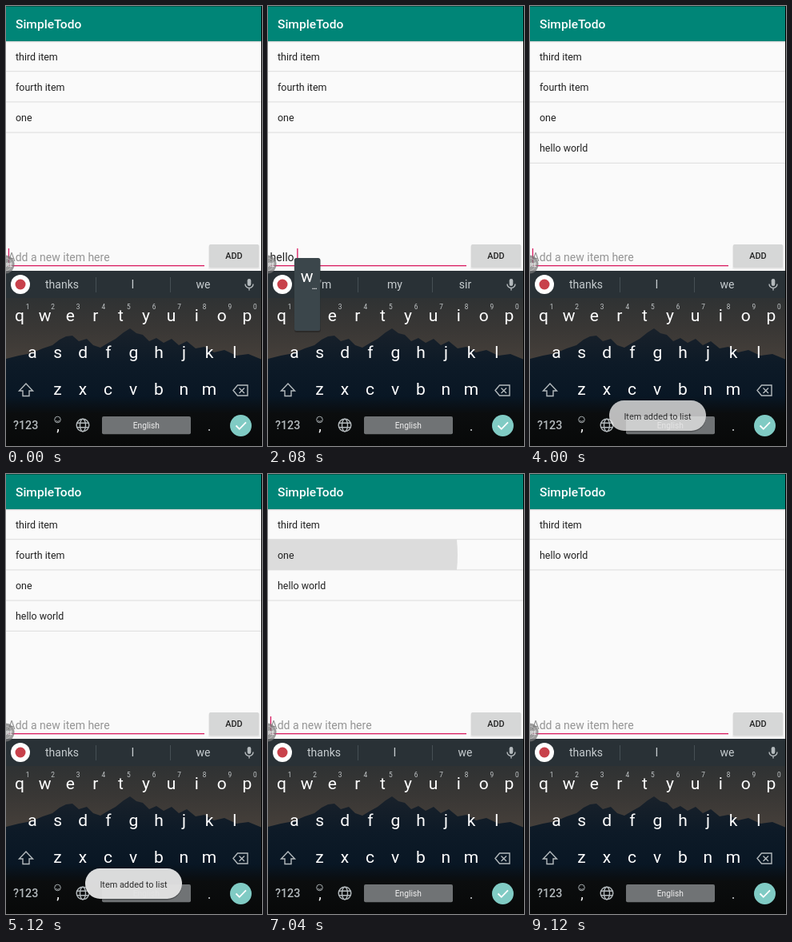
Recreate the animation shown at these times as an HTML page. Size 320 by 550 pixels, loop 9600 ms.

```html
<!DOCTYPE html>
<html lang="en">
<head>
<meta charset="utf-8">
<title>Todo list</title>
<style>
html, body { margin: 0; width: 100%; height: 100%; overflow: hidden; background: #fafafa; }
svg { display: block; width: 320px; height: 550px; font-family: Roboto, "Noto Sans", sans-serif; }
text { white-space: pre; }
.line { fill: none; stroke: #b4babd; stroke-width: 1.4; }
.thin { stroke-width: .9; }
#composing { text-decoration: underline; text-decoration-thickness: 1px; }
</style>
</head>
<body>
<svg id="stage" viewBox="0 0 320 550">
  <defs>
    <linearGradient id="shade" x2="0" y2="1">
      <stop stop-color="#000" stop-opacity=".18"/><stop offset="1" stop-color="#000" stop-opacity="0"/>
    </linearGradient>
    <linearGradient id="sky" gradientUnits="userSpaceOnUse" x1="0" x2="0" y1="365" y2="440">
      <stop stop-color="#2f3233"/><stop offset=".5" stop-color="#393735"/><stop offset="1" stop-color="#453f3a"/>
    </linearGradient>
    <linearGradient id="rock" gradientUnits="userSpaceOnUse" x1="0" x2="0" y1="400" y2="505">
      <stop stop-color="#1a222b"/><stop offset=".45" stop-color="#0d1a27"/><stop offset="1" stop-color="#071523"/>
    </linearGradient>
    <linearGradient id="ground" x2="0" y2="1">
      <stop stop-color="#0b0d0e" stop-opacity="0"/><stop offset=".35" stop-color="#0b0d0e"/><stop offset="1" stop-color="#080909"/>
    </linearGradient>
    <clipPath id="rowClip"><rect y="82" width="319" height="38"/></clipPath>
  </defs>

  <rect width="320" height="550" fill="#fafafa"/>
  <g clip-path="url(#rowClip)">
    <rect id="hot" y="82" width="319" height="38" fill="#e2e2e2"/>
    <circle id="ripple" cx="60" cy="101" r="177" fill="#dcdcdc"/>
  </g>
  <g id="list"></g>
  <rect width="320" height="44" fill="#008577"/>
  <rect width="320" height="1" fill="#00574b"/>
  <rect y="44" width="320" height="2" fill="url(#shade)"/>

  <text id="input" x="2.6" y="318.6" font-size="14"><tspan id="done"></tspan><tspan id="composing"></tspan></text>
  <rect id="caret" y="303" width="1.3" height="19" fill="#d81b60"/>
  <rect x="2.5" y="324" width="245.5" height="1.3" fill="#d81b60"/>
  <rect id="addShade" x="253" y="298.5" width="64" height="31" rx="2.5" fill="#000"/>
  <rect id="add" x="254" y="298" width="62" height="29.3" rx="1.5"/>

  <g id="keyboard">
    <rect y="331" width="320" height="219" fill="url(#sky)"/>
    <path fill="url(#rock)" d="M0 441 16 437 32 434 46 428 58 424 67 417 75 413 83 412 91 419 101 416 109 424 118 427 128 421 137 416 147 408 155 403 163 409 171 411 179 419 188 415 197 421 207 416 216 424 226 419 237 428 248 426 260 433 273 430 288 437 303 435 320 442V550H0Z"/>
    <rect y="488" width="320" height="62" fill="url(#ground)"/>
    <rect y="331" width="320" height="34" fill="#293136"/>
    <path stroke="#465055" d="M112.5 339V358M205.5 339V358"/>
    <circle cx="18" cy="348" r="12" fill="#fff"/>
    <circle cx="18" cy="348" r="6.5" fill="#c8414b"/>
    <rect x="301.7" y="341" width="4.6" height="9" rx="2.3" fill="#b4babd"/>
    <path class="line" d="M299 347.5a5 5 0 0 0 10 0M304 352.5V355.5"/>
    <path class="line" d="M25 472 16.5 481H21V487.5H29V481H33.5Z"/>
    <path class="line" d="M289.5 474H302V487H289.5L284 480.5ZM291.5 477.5 298 484M298 477.5 291.5 484"/>
    <g class="line">
      <circle cx="96" cy="524" r="7.8"/>
      <ellipse cx="96" cy="524" rx="3.5" ry="7.8"/>
      <path d="M89 521.2H103M89 526.8H103"/>
    </g>
    <g class="line thin">
      <circle cx="64.5" cy="517" r="3.8"/>
      <path d="M62.4 518a2.3 2.3 0 0 0 4.2 0M63 515.8v.3M66 515.8v.3"/>
    </g>
    <rect x="120" y="513" width="111" height="22.3" rx="2" fill="#707375"/>
    <circle cx="293.5" cy="524.5" r="13.5" fill="#80cbc4"/>
    <path d="M287.5 524.5 291.8 528.8 300 520.3" fill="none" stroke="#fff" stroke-width="1.8"/>
  </g>
  <g id="hints"></g>

  <g id="popup">
    <rect x="-15.7" y="1" width="33" height="92" rx="3" fill="#000" opacity=".25"/>
    <rect x="-15.7" width="32.4" height="91" rx="2.5" fill="#3b464b"/>
    <text id="popupKey" y="30" font-size="21" fill="#fff" text-anchor="middle"></text>
    <text x="9.5" y="39" font-size="9" font-weight="700" fill="#fff" text-anchor="middle">…</text>
  </g>

  <g id="badge">
    <circle cx="-1" cy="323" r="11.5" fill="#777" opacity=".72"/>
    <circle cx="-1" cy="323" r="8" fill="none" stroke="#c9c9c9" opacity=".7"/>
  </g>

  <g id="toast">
    <rect x="99" y="494.5" width="121" height="38" rx="18.5" fill="#000" opacity=".3"/>
    <rect x="99" y="493" width="121" height="38" rx="18.5" fill="#e6e6e6" opacity=".95"/>
  </g>
  <rect x="319" width="1" height="550"/>
</svg>
<script>
const $ = id => document.getElementById(id);

function make(parent, name, attrs, text) {
  const el = document.createElementNS("http://www.w3.org/2000/svg", name);
  for (const k in attrs) el.setAttribute(k, attrs[k]);
  if (text) el.textContent = text;
  return parent.appendChild(el);
}

function label(parent, x, y, text, size, fill, anchor = "middle", weight = 400) {
  return make(parent, "text", {
    x, y, "font-size": size, fill, "text-anchor": anchor, "font-weight": weight
  }, text);
}

const stage = $("stage"), board = $("keyboard");
stage.insertBefore(label(stage, 12, 28.2, "SimpleTodo", 15.56, "#fff", "start", 500), $("input"));
stage.insertBefore(label(stage, 285, 316.1, "ADD", 10.9, "#222", "middle", 500), board);
label($("badge"), 0, 325.8, "RE", 7, "#f4f4f4", "start", 500);
label($("toast"), 159.5, 516.6, "Item added to list", 10.9, "#2b2b2b");

// Letter keys
const keys = {};
["qwertyuiop", "asdfghjkl", "zxcvbnm"].forEach((row, r) => {
  const left = [17, 33, 64.4][r];
  [...row].forEach((ch, i) => {
    const x = left + i * 31.6, y = 394 + r * 46;
    keys[ch] = { x, y };
    label(board, x, y, ch, 21, "#fff");
    if (!r) label(board, x + 10, y - 15, String((i + 1) % 10), 8.3, "#c4c8ca");
  });
});
label(board, 24.6, 529.3, "?123", 14.3, "#b4babd", "middle", 500);
label(board, 65, 531, ",", 18, "#fff");
label(board, 254, 531, ".", 18, "#c8ccce");
label(board, 175.3, 528, "English", 10.2, "#f0f0f0");

const hints = [70, 158.5, 246.5].map(x => label($("hints"), x, 353, "", 14, "#c6cccf"));
const rows = [0, 1, 2, 3].map(i => {
  const g = make($("list"), "g", { transform: `translate(0 ${i * 38.2})` });
  make(g, "rect", { y: 81.2, width: 319, height: 1, fill: "#dcdcdc" });
  return { g, text: label(g, 12, 67.8, "", 12.44, "#212121", "start") };
});

const idle = "thanks|I|we", next = "I'm|my|sir", greet = "hello|help|held", globe = "world|world is|works";
const full = ["third item", "fourth item", "one", "hello world"];
const start = {
  done: "", composing: "", hints: idle, key: "", caret: 1, add: "#d6d7d7",
  list: full.slice(0, 3), hot: 0, ripple: 0, toast: 0
};

// Each entry changes part of the state from its time on.
const steps = [
  [0, {}],
  [160, { caret: 0 }],
  [640, { caret: 1 }],
  [960, { key: "h" }],
  [1120, { composing: "h", key: "e", hints: "he|have|how" }],
  [1280, { composing: "he", key: "l", hints: "he|her|hey" }],
  [1440, { composing: "hell", key: "o", hints: greet }],
  [1600, { done: "hello ", composing: "", key: "", hints: next }],
  [2080, { key: "w" }],
  [2240, { composing: "w", key: "o", hints: "we|will|with" }],
  [2400, { composing: "wo", key: "r", hints: "would|world|work" }],
  [2560, { composing: "worl", key: "d", hints: globe }],
  [2720, { composing: "world", key: "" }],
  [3040, { caret: 0 }],
  [3520, { add: "#b9baba" }],
  [3680, { add: "#c4c5c5" }],
  [3840, { add: "#d6d7d7", done: "", composing: "", hints: idle, caret: 1, list: full, toast: 0.4 }],
  [4000, { toast: 0.85 }],
  [4160, { toast: 1, caret: 0 }],
  [4640, { caret: 1 }],
  [5120, { caret: 0 }],
  [5600, { caret: 1, ripple: 1 }],
  [5760, { ripple: 0, hot: 1, toast: 0.5 }],
  [5920, { toast: 0 }],
  [6080, { caret: 0, list: [full[0], full[2], full[3]] }],
  [6240, { hot: 0 }],
  [6560, { caret: 1 }],
  [7040, { ripple: 1 }],
  [7200, { ripple: 0, hot: 1, caret: 0 }],
  [7520, { list: [full[0], full[3]] }],
  [7680, { hot: 0, caret: 1 }],
  [8160, { caret: 0 }],
  [8640, { caret: 1 }],
  [9120, { caret: 0 }]
];
let last = start;
const states = steps.map(([at, change]) => (last = { ...last, ...change, at }));

const show = (el, on) => el.setAttribute("opacity", +on);

function render(s) {
  const empty = !(s.done || s.composing);
  $("done").textContent = empty ? "Add a new item here" : s.done;
  $("composing").textContent = s.composing;
  $("input").setAttribute("fill", empty ? "#949494" : "#212121");
  $("caret").setAttribute("x", 2.8 + (empty ? 0 : $("input").getComputedTextLength()));
  show($("caret"), s.caret);
  $("add").setAttribute("fill", s.add);
  show($("addShade"), s.add === start.add ? 0.06 : 0.28);
  show($("hot"), s.hot);
  show($("ripple"), s.ripple);
  show($("toast"), s.toast);
  s.hints.split("|").forEach((word, i) => { hints[i].textContent = word; });
  rows.forEach((row, i) => {
    show(row.g, i < s.list.length);
    row.text.textContent = s.list[i] || "";
  });
  show($("popup"), s.key !== "");
  if (s.key) {
    const { x, y } = keys[s.key];
    $("popup").setAttribute("transform", `translate(${x} ${y - 79})`);
    $("popupKey").textContent = s.key;
  }
}

let shown = null;
function tick() {
  const t = performance.now() % 9600;
  const s = states.filter(v => v.at <= t).pop();
  if (s !== shown) render(shown = s);
  requestAnimationFrame(tick);
}
tick();
</script>
</body>
</html>
```
